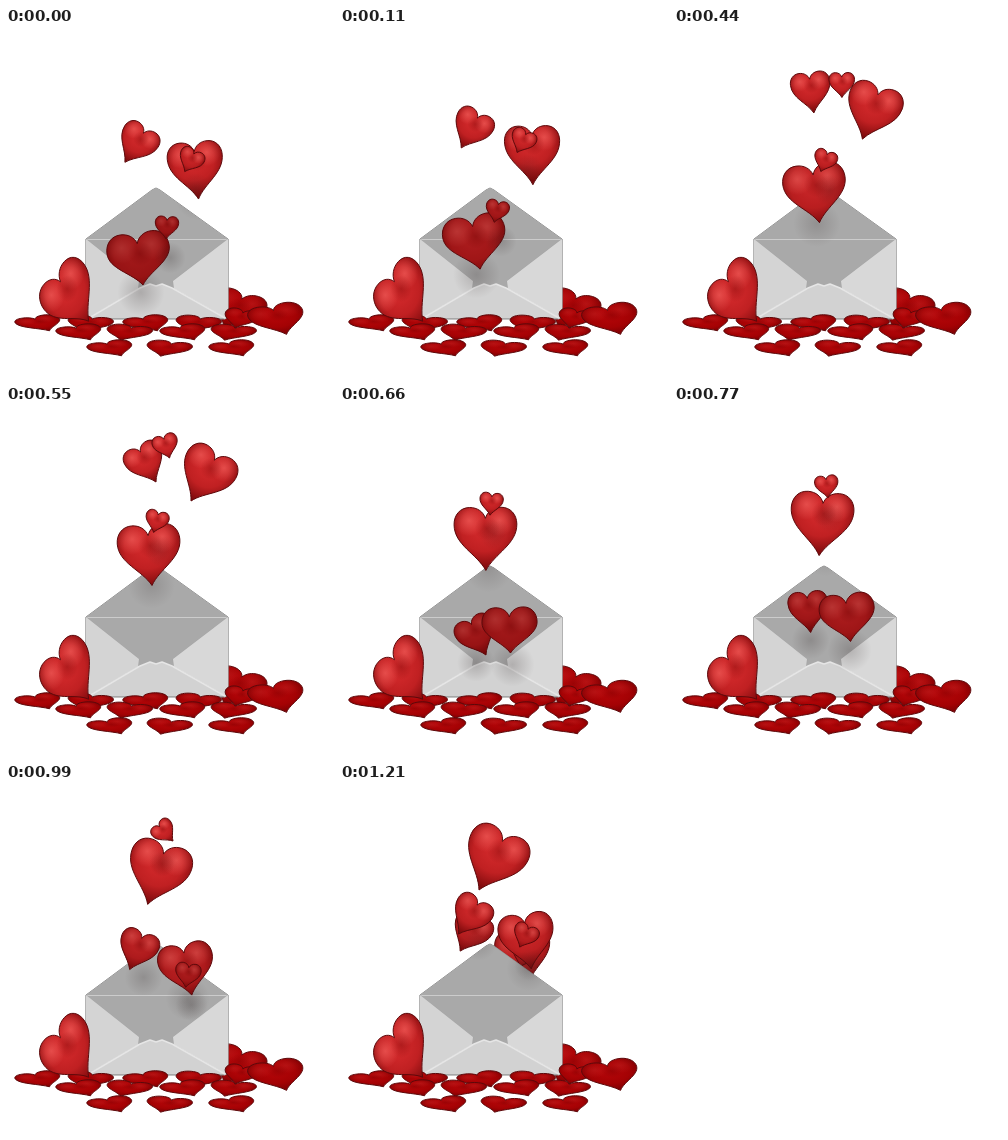
Recreate the animation shown at these times as an HTML page with a canvas. Size 328 by 350 pixels, loop 1.32 s.

```html
<!DOCTYPE html>
<html lang="en">
<head>
<meta charset="utf-8">
<title>Love letter</title>
<style>
  html, body { margin: 0; width: 100%; height: 100%; overflow: hidden; background: #fff; }
  canvas { display: block; }
</style>
</head>
<body>
<canvas width="328" height="350"></canvas>
<script>
const ctx = document.querySelector('canvas').getContext('2d');
const STEP = 110, COUNT = 12;

// Each heart flies a parabola through three poses: [middle x, top, lean of the tip, height].
const flyers = [
  { born: 6, life: 11, size: 19.8, path: [[133, 207, 13, 42], [135.5, 100, -17, 42], [136, 34, 14, 42]] },
  { born: 6, life: 11, size: 27.6, path: [[169.5, 201, 1, 46], [187, 120, 5, 58], [206, 37, -21, 58]] },
  { born: 0, life: 10, size: 31.4, path: [[132, 203, 5, 54], [142.5, 117.5, 3.5, 62], [160, 39, -21, 67]] },
  { born: 0, life: 9, size: 11.7, path: [[161, 188, -1, 23], [152, 112, -5, 23], [155, 34, 12, 23]] },
  { born: 8, life: 9, size: 12.8, path: [[177.5, 199, 1, 25], [186, 109, -8, 25], [158.5, 27, 5, 25]] }
];

const LIVE = { light: '#d42a2c', mid: '#c02022', dark: '#7d0a0c', shine: 0.55 };
const DULL = { light: '#b40508', mid: '#a40204', dark: '#760003', shine: 0.14 };

function glow(x, y, r, rgb, alpha) {
  const g = ctx.createRadialGradient(x, y, 0, x, y, r);
  g.addColorStop(0, `rgba(${rgb},${alpha})`);
  g.addColorStop(1, `rgba(${rgb},0)`);
  return g;
}

// (x, y) lies midway between the lobes; len is the distance to the tip in sizes.
function heart(x, y, angle, size, len, look, flat = 1, shade = 0) {
  ctx.save();
  ctx.translate(x, y);
  ctx.scale(1, flat);
  ctx.rotate(angle);
  ctx.scale(size, size);
  ctx.beginPath();
  ctx.moveTo(0, -0.17);
  ctx.bezierCurveTo(-0.06, -0.38, -0.25, -0.52, -0.5, -0.52);
  ctx.bezierCurveTo(-0.8, -0.52, -1, -0.29, -1, 0.02);
  ctx.bezierCurveTo(-1, len * 0.45, -0.28, len * 0.64, 0, len);
  ctx.bezierCurveTo(0.28, len * 0.64, 1, len * 0.45, 1, 0.02);
  ctx.bezierCurveTo(1, -0.29, 0.8, -0.52, 0.5, -0.52);
  ctx.bezierCurveTo(0.25, -0.52, 0.06, -0.38, 0, -0.17);
  ctx.closePath();
  const base = ctx.createRadialGradient(-0.1, 0.1, 0.1, 0, 0.2, 1.25);
  base.addColorStop(0, look.light);
  base.addColorStop(0.55, look.mid);
  base.addColorStop(1, look.dark);
  const layers = [base, glow(-0.52, -0.1, 0.5, '255,110,105', look.shine),
    glow(0.45, -0.1, 0.5, '255,110,105', look.shine),
    glow(0.05, 0.15, 0.4, '110,0,0', 0.35), `rgba(90,0,0,${shade})`];
  for (const layer of layers) {
    ctx.fillStyle = layer;
    ctx.fill();
  }
  ctx.restore();
  ctx.strokeStyle = '#5c090b';
  ctx.lineWidth = 1;
  ctx.stroke();
}

function lying(x, y, w, h, angle) {
  heart(x, y - h * 0.22, angle, w / 2, 1.4, DULL, h / w);
}

function line(pts, color, width = 1) {
  ctx.beginPath();
  pts.forEach(p => ctx.lineTo(...p));
  ctx.strokeStyle = color;
  ctx.lineWidth = width;
  ctx.stroke();
}

function poly(fill, edge, pts) {
  line([...pts, pts[0]], edge);
  ctx.fillStyle = fill;
  ctx.fill();
}

function envelope() {
  ctx.lineJoin = 'round';
  poly('#a9a9a9', '#858585', [[80, 211], [146, 162], [150, 160], [154, 162], [222, 211], [222, 289], [219, 291], [83, 291], [80, 288]]);
  line([[81, 211.5], [221, 211.5]], '#cccccc');
  poly('#d4d4d4', '#a4a4a4', [[80, 211], [133, 253], [132, 261], [83, 291], [80, 288]]);
  poly('#d8d8d8', '#a4a4a4', [[222, 211], [167, 253], [168, 261], [219, 291], [222, 288]]);
  const crest = [[83, 290], [134, 260], [144, 256], [150, 258], [156, 256], [166, 260], [219, 290]];
  poly('#d2d2d2', '#a4a4a4', crest);
  line(crest, '#e6e6e6', 1.5);
}

function scenery() {
  lying(234, 283, 56, 40, 0.4);
  envelope();
  // Rows from back to front: count, first x, gap, y.
  for (const [n, x, gap, y] of [[4, 31, 54, 296], [4, 72, 52, 305], [3, 103, 61, 321]])
    for (let i = 0; i < n; i++) lying(x + i * gap, y, 46, 16, i % 2 ? 0.3 : -0.4);
  lying(236, 291, 34, 20, 0.3);
  lying(269, 292, 56, 32, -0.3);
  heart(57.5, 258, -0.73, 27, 1.4, LIVE, 1.25);
}

function flight(step) {
  for (const { born, life, size, path: [a, b, c] } of flyers) {
    const u = (step - born + COUNT) % COUNT / life;
    if (u > 1) continue;
    const [x, top, lean, height] = a.map((v, i) =>
      v * (1 - u) * (1 - 2 * u) + b[i] * 4 * u * (1 - u) + c[i] * u * (2 * u - 1));

    // The soft shadow falls only on what is already painted.
    const sx = x + 3, sy = top + size + 30, r = size * 0.4 + 11;
    ctx.globalCompositeOperation = 'source-atop';
    ctx.fillStyle = glow(sx, sy, r, '40,30,30', 0.22 * (1 - u / 2));
    ctx.fillRect(sx - r, sy - r, 2 * r, 2 * r);
    ctx.globalCompositeOperation = 'source-over';

    const y = top + size * 0.52 + Math.abs(lean) * 0.33, drop = top + height - y;
    const shade = Math.max(0, 0.4 - u * 0.8);
    heart(x, y, Math.atan2(-lean, drop), size, Math.hypot(lean, drop) / size, LIVE, 1, shade);
  }
}

function draw(now) {
  const step = Math.floor(now / STEP) % COUNT;
  ctx.clearRect(0, 0, 328, 350);
  // The last step leaves the previous hearts standing behind the envelope.
  if (step === COUNT - 1) flight(step - 1);
  scenery();
  flight(step);
  requestAnimationFrame(draw);
}
requestAnimationFrame(draw);
</script>
</body>
</html>
```
